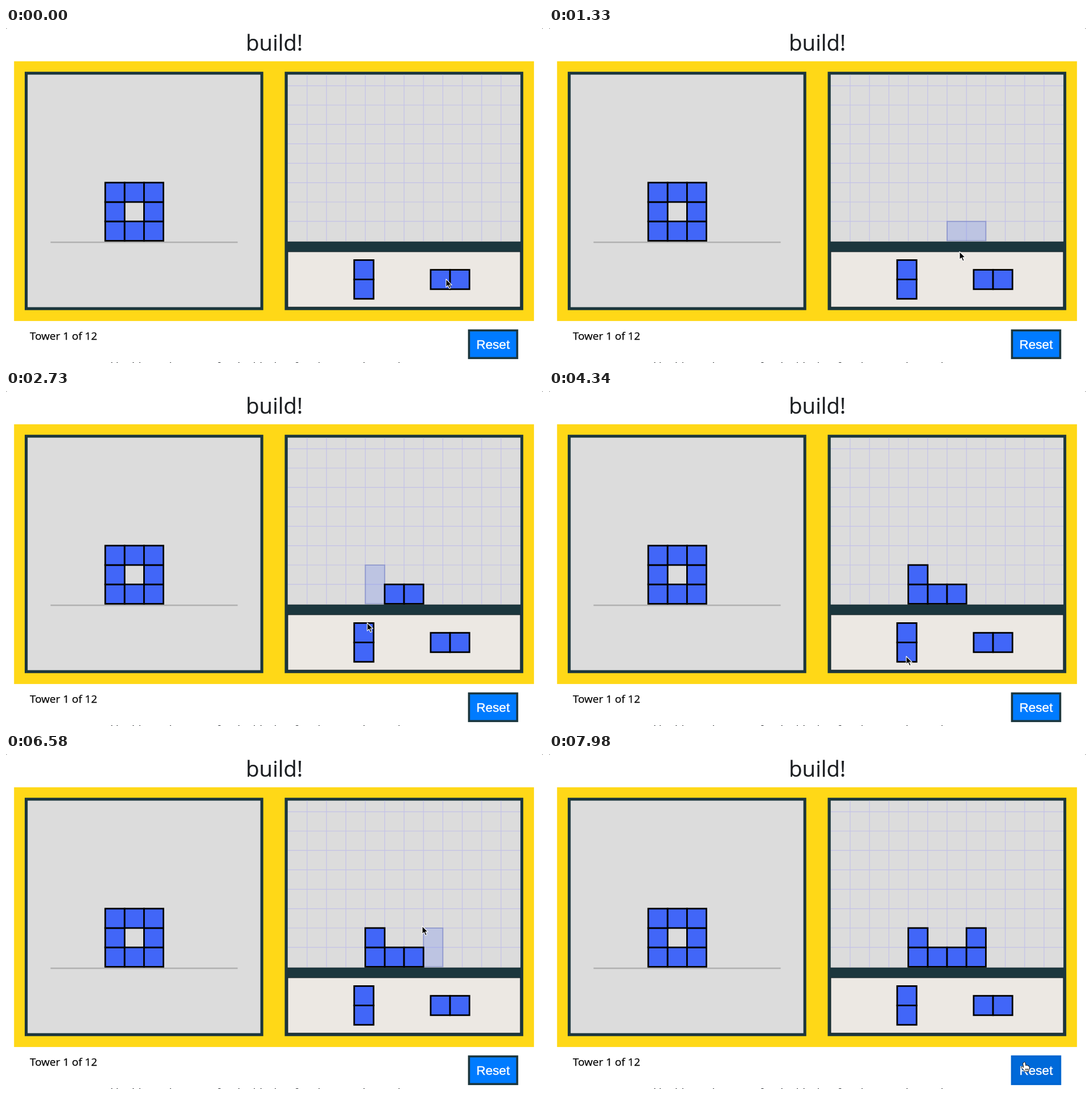
An HTML page that plays this animation: 947 by 591 pixels, repeating every 8000 ms.

```html
<!DOCTYPE html>
<html lang="en">
<head>
<meta charset="utf-8">
<title>build!</title>
<style>
  html, body { margin: 0; width: 100%; height: 100%; overflow: hidden; background: #fff; }
  svg { display: block; width: 947px; height: 591px; }
  text { font-family: "Open Sans", "Noto Sans", sans-serif; fill: #1c1f22; stroke: #1c1f22; stroke-width: .25; }
  #label { fill: #000; stroke: #000; }
  #reset { font-family: "Liberation Sans", Arial, sans-serif; fill: #fff; stroke: #fff; stroke-width: .4; }
  .cell { fill: #4166f8; stroke: #000; stroke-width: 2.8; }
  .frame { fill: #1b363d; }
  .pane { fill: #dcdcdc; }
  #ghost rect { fill: #4166f8; fill-opacity: .2; stroke: #3c50a0; stroke-opacity: .32; stroke-width: 2; }
</style>
</head>
<body>
<svg viewBox="0 0 947 591">
  <path d="M0 0h2L0 2zM947 0h-2l2 2z" fill="#999"/>
  <text x="473.2" y="39.5" font-size="38.4" text-anchor="middle">build!</text>
  <rect x="14.2" y="58.700" width="916.900" height="458.200" fill="#ffd817"/>

  <rect class="frame" x="33" y="77.200" width="420.700" height="420.500"/>
  <rect class="pane" x="38.2" y="82.300" width="410.400" height="410.200"/>
  <path d="M78.5 378H408.5" stroke="#b0b0b0" stroke-width="2.6"/>
  <g id="goal"></g>

  <rect class="frame" x="491.500" y="77.200" width="420.700" height="420.500"/>
  <rect class="pane" x="496.800" y="82.300" width="410.400" height="294.200"/>
  <path id="grid" stroke="#c4c2e8" stroke-width="1.2"/>
  <path d="M497 376.4H907" stroke="#b0b0b0"/>
  <rect x="497" y="394.8" width="410" height="97.5" fill="#ece8e3" stroke="#101c20"/>
  <g id="tray"></g>
  <g id="ghost"></g>
  <g id="built"></g>

  <text id="label" x="42" y="550" font-size="19">Tower 1 of 12</text>
  <rect id="button" x="816.5" y="533.5" width="85" height="48.8" stroke-width="3.6"/>
  <text id="reset" x="859" y="565.5" font-size="22.5" text-anchor="middle">Reset</text>
  <text x="155" y="604" font-size="19">and build it in the space for the blocks of each tower that is shown</text>

  <circle id="ring" r="21" fill="none" stroke="#000" stroke-opacity=".6" stroke-width="2"/>
  <path id="arrow" d="M0 0V14.2L3.3 11.2L5.7 16.8L8.2 15.7L5.8 10.3H10.3Z" fill="#000" stroke="#fff" stroke-width="1.1" stroke-linejoin="round"/>
  <path id="hand" d="M-2 0C-2-2 1-2 1 0L2 5L3 4Q4.500 3 5 5Q6.500 4 7 6Q8.500 5.500 8.500 8L8 11L6.500 15H0L-2.500 12L-6 8.500Q-7 6-4.500 6.500L-2 8L-3.500 1Q-3.500 0-2 0ZM1.500 10v3M3.500 10v3M5.500 10v3" fill="#fff" stroke="#111" stroke-linejoin="round"/>
</svg>
<script>
const $ = id => document.getElementById(id);
const LOOP = 8000, STEP = 70, CELL = 34.2;
const LEFT = 496.8, FLOOR = 375.4, COLS = 12;
const CLICK = 140;

// Eased cursor glides: start time, end time, where it arrives
const ORIGIN = [776, 443];
const GLIDES = [
  [350, 980, 760, 437],
  [1120, 1540, 688, 352],
  [1820, 2380, 641, 454],
  [2520, 2730, 637, 409],
  [2730, 3080, 651.5, 380],
  [3990, 4340, 630, 468],
  [4900, 5460, 703.5, 312],
  [5530, 6160, 716, 305],
  [6440, 6720, 752, 302],
  [7140, 7980, 839, 545]
];

// Pieces in cells, each held between pick-up and drop
const MOVES = [
  { w: 2, h: 1, pick: 1190, drop: 1820 },
  { w: 1, h: 2, pick: 2520, drop: 3850 },
  { w: 1, h: 2, pick: 4760, drop: 7000 }
];

const box = (x, y, w, h, cls = '') =>
  `<rect class="${cls}" x="${x}" y="${y}" width="${w}" height="${h}"/>`;

function blocks(x, bottom, w, h, hollow) {
  let out = '';
  for (let c = 0; c < w; c++)
    for (let r = 1; r <= h; r++)
      if (!hollow || c % (w - 1) === 0 || r === 1 || r === h)
        out += box(x + c * CELL, bottom - r * CELL, CELL, CELL, 'cell');
  return out;
}

function drawStatic() {
  $('goal').innerHTML = blocks(175, FLOOR, 3, 3, true);
  $('tray').innerHTML = blocks(614, 477.8, 1, 2) + blocks(748.9, 460.8, 2, 1);
  let d = '';
  for (let i = 1; i < COLS; i++) d += `M${LEFT + i * CELL} 82.5V376`;
  for (let i = 1; i < 9; i++) d += `M497 ${FLOOR - i * CELL}H907`;
  $('grid').setAttribute('d', d);
}

const clamp = k => Math.max(0, Math.min(1, k));
const ease = k => k * k * (3 - 2 * k);

function cursorAt(t) {
  let [x, y] = ORIGIN;
  for (const [from, to, tx, ty] of GLIDES) {
    const k = ease(clamp((t - from) / (to - from)));
    x += (tx - x) * k;
    y += (ty - y) * k;
  }
  return [x, y];
}

const columnAt = t => Math.round((cursorAt(t)[0] - 13 - LEFT) / CELL);
const show = (el, on) => el.setAttribute('visibility', on ? 'visible' : 'hidden');

function render(t) {
  const [x, y] = cursorAt(t);
  const heights = Array(COLS).fill(0);
  let built = '', ghost = '', clicking = false;
  for (const { w, h, pick, drop } of MOVES) {
    clicking ||= [pick, drop].some(end => t >= end - CLICK && t < end);
    if (t < pick) continue;
    const col = columnAt(Math.min(t, drop));
    const base = Math.max(...heights.slice(col, col + w));
    const left = LEFT + col * CELL, bottom = FLOOR - base * CELL;
    if (t < drop) {
      ghost = box(left, bottom - h * CELL, w * CELL, h * CELL);
    } else {
      built += blocks(left, bottom, w, h);
      heights.fill(base + h, col, col + w);
    }
  }
  $('built').innerHTML = built;
  $('ghost').innerHTML = ghost;

  const hover = x > 815 && y > 532;
  $('button').setAttribute('fill', hover ? '#0069d9' : '#007bff');
  $('button').setAttribute('stroke', hover ? '#0065d0' : '#1b363d');
  show($('arrow'), !hover);
  show($('hand'), hover);
  show($('ring'), clicking);
  for (const id of ['arrow', 'hand', 'ring'])
    $(id).setAttribute('transform', `translate(${x} ${y})`);
}

drawStatic();
const start = performance.now();
function tick() {
  const t = (performance.now() - start) % LOOP;
  render(Math.floor(t / STEP) * STEP);
  requestAnimationFrame(tick);
}
tick();
</script>
</body>
</html>
```
